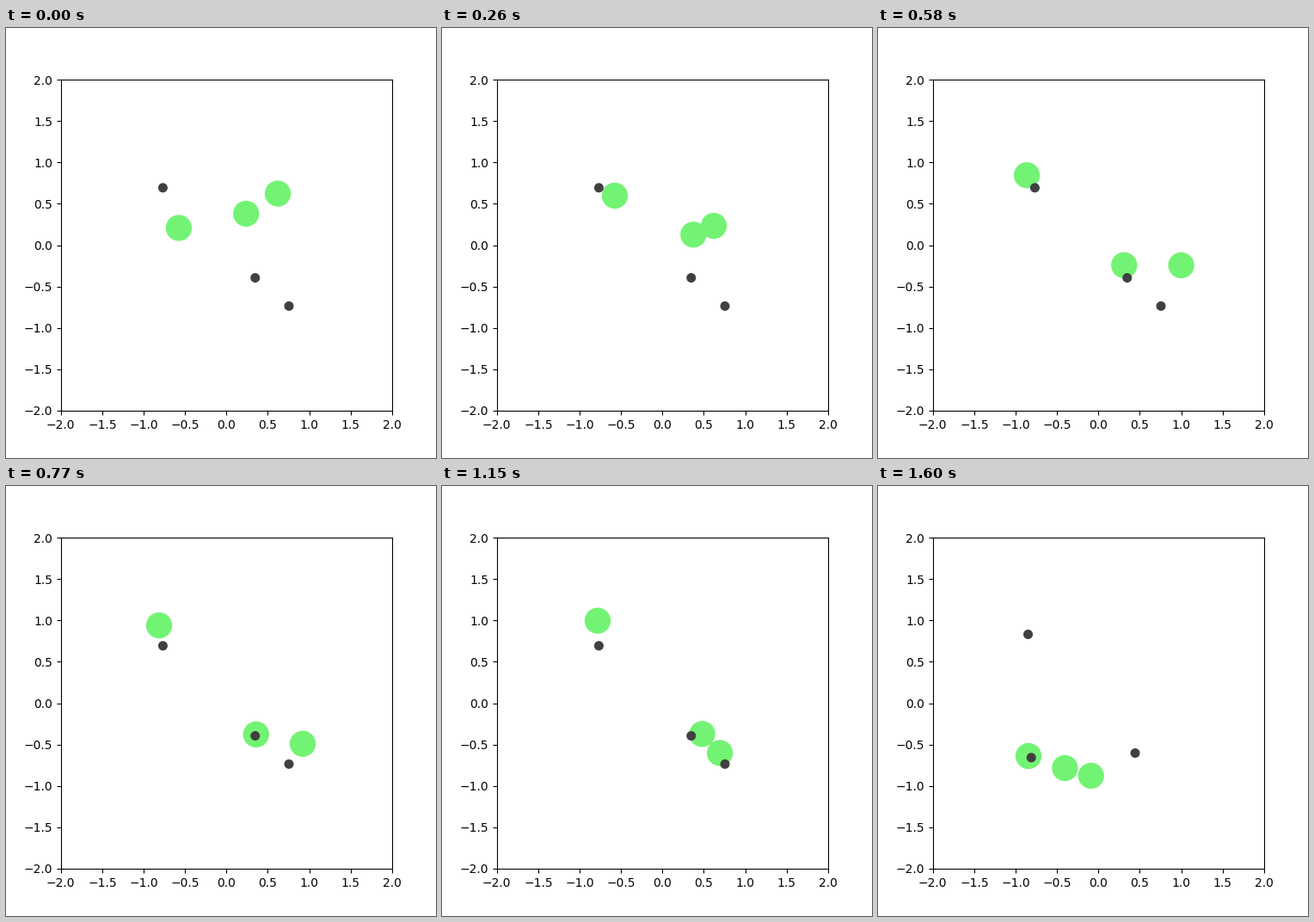
Animation, 500 px wide and 500 px high, one loop 1660 ms. Source, as a matplotlib script:

```python
import numpy as np
import matplotlib.pyplot as plt
from matplotlib.animation import FuncAnimation
from matplotlib.patches import Circle

TICK_MS, LOOP_MS, STEP_MS = 10, 1660, 64
STEPS = 25          # steps before the scene changes
DT, DRAG = 0.1, 0.25
THRUST, STIFFNESS = 5, 100
DISC_R, MARK_R = 0.15, 0.05

GREEN = np.array([115, 243, 115]) / 255
GREY = np.array([64, 64, 64]) / 255

# One move per step for each disc; a dot means coasting.
MOVES = {"U": (0, 1), "D": (0, -1), "L": (-1, 0), "R": (1, 0), ".": (0, 0)}
PLANS = ["UUUULLD.UR",
         "RDDDDLRU.D.R.U.D.U..UR",
         "DDDDRRDD.LDLUL.RDL.RUR.L"]

DISCS = np.array([(-.575, .208), (.238, .380), (.621, .623)])
MARKS = np.array([(-.767, .693), (.348, -.395), (.756, -.736)])
NEXT_DISCS = np.array([(-.844, -.639), (-.404, -.784), (-.088, -.877)])
NEXT_MARKS = np.array([(-.849, .831), (-.811, -.658), (.444, -.603)])


def contact_force(pos):
    """Springs that push overlapping discs apart."""
    gap = pos[:, None] - pos[None]
    dist = np.linalg.norm(gap, axis=2) + np.eye(len(pos))
    overlap = np.maximum(0, 2 * DISC_R - dist)
    return STIFFNESS * (gap * (overlap / dist)[..., None]).sum(axis=1)


def simulate(pos):
    """Positions of all discs at every step, as damped point masses."""
    thrust = THRUST * np.array([[MOVES[m] for m in moves] for moves in
                                zip(*(p.ljust(STEPS, ".") for p in PLANS))])
    vel = thrust[0] * DT
    path = [pos]
    for push in thrust[1:]:
        force = push + contact_force(pos)
        pos = pos + vel * DT
        vel = vel * (1 - DRAG) + force * DT
        path.append(pos)
    return path


path = simulate(DISCS)

fig, ax = plt.subplots(figsize=(5, 5), dpi=100)
ax.set_xlim(-2, 2)
ax.set_ylim(-2, 2)
ax.set_aspect("equal")


def add_circles(centers, radius, color):
    return [ax.add_patch(Circle(c, radius, color=color)) for c in centers]


circles = add_circles(DISCS, DISC_R, GREEN) + add_circles(MARKS, MARK_R, GREY)


def draw(tick):
    step = int((tick + 0.5) * TICK_MS / STEP_MS)
    if step < STEPS:
        centers = [*path[step], *MARKS]
    else:
        centers = [*NEXT_DISCS, *NEXT_MARKS]
    for circle, center in zip(circles, centers):
        circle.center = tuple(center)
    return circles


anim = FuncAnimation(fig, draw, frames=LOOP_MS // TICK_MS, interval=TICK_MS,
                     repeat=True, repeat_delay=0)
plt.show()
```
